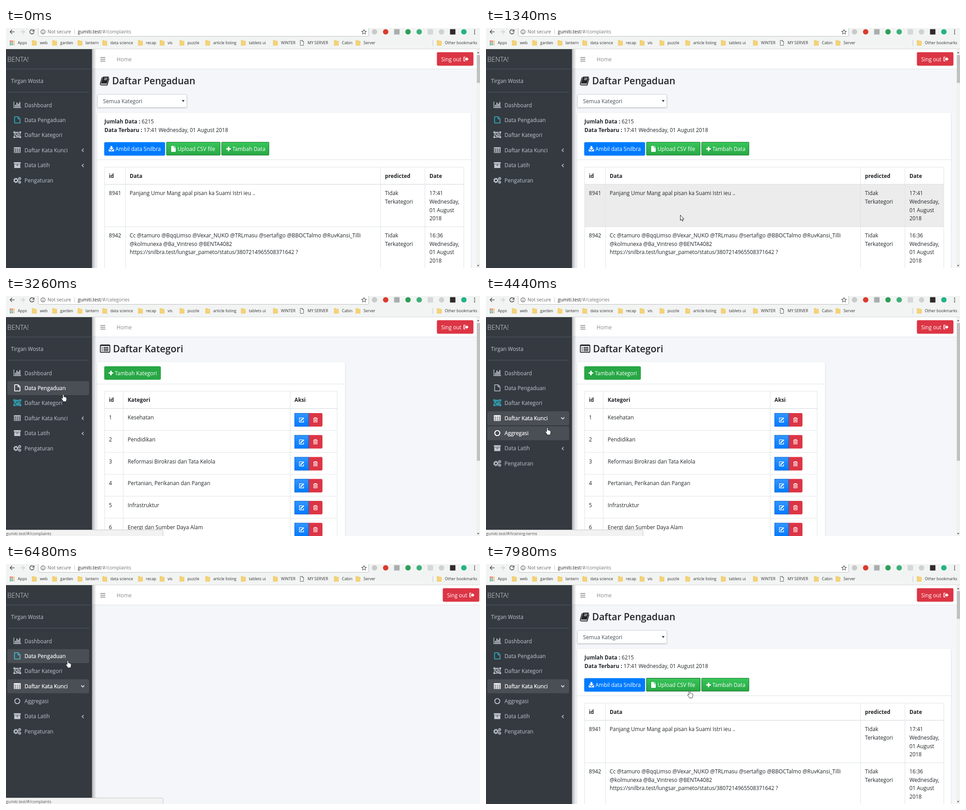
These frames come from a looping animation (1050 px wide and 533 px high, 8 s). An HTML page:

```html
<!DOCTYPE html>
<html lang="id">
<head>
<meta charset="utf-8">
<title>Daftar Pengaduan</title>
<style>
html, body { margin: 0; width: 100%; height: 100%; overflow: hidden; background: #f4f6f9; }
svg { display: block; }
text { font: 11.8px "Open Sans", "Noto Sans", sans-serif; fill: currentColor; white-space: pre; }
.b { font-weight: 700; }
.h { font-size: 21px; font-weight: 600; }
.brand { font-size: 14.9px; font-weight: 300; }
.url { font-size: 10.3px; }
.mark, .stat { font-size: 8.75px; }
.ln { fill: none; stroke: currentColor; }
.so { fill: currentColor; }
.rule { fill: none; stroke: #dee2e6; }
.card { fill: #fff; filter: drop-shadow(0 1px 1px rgba(0,0,0,.2)); }
.field { fill: #fff; stroke: #ced4da; }

/* one loop is 8 s, so 1% is 80 ms */
.t { opacity: 0; animation: 8s step-end infinite; }
.f { animation: 8s linear infinite; }

#pageList { animation-name: pageList; }
#pageCat { animation-name: pageCat; }
#pageTerm { animation-name: pageTerm; }
@keyframes pageList { 0%, 33% { opacity: 1 } 36%, 82% { opacity: 0 } 85.875%, 100% { opacity: 1 } }
@keyframes pageCat { 0%, 37% { opacity: 0 } 40%, 57.625% { opacity: 1 } 60.625%, 100% { opacity: 0 } }
@keyframes pageTerm { 0%, 65% { opacity: 0 } 69.375%, 78.125% { opacity: 1 } 81%, 100% { opacity: 0 } }

#urlList, #actData { animation-name: urlList; }
#urlCat, #actCat { animation-name: urlCat; }
#urlTerm, #actTerm { animation-name: urlTerm; }
@keyframes urlList { 0%, 78.125% { opacity: 1 } 33% { opacity: 0 } }
@keyframes urlCat { 33% { opacity: 1 } 57.625% { opacity: 0 } }
@keyframes urlTerm { 57.625% { opacity: 1 } 78.125% { opacity: 0 } }

#row1 { animation-name: row1; }
#row2 { animation-name: row2; }
#upHot { animation-name: upHot; }
@keyframes row1 { 12.5%, 15.75%, 84% { opacity: 1 } 13.625%, 20.5%, 91% { opacity: 0 } }
@keyframes row2 { 2.75%, 13.625% { opacity: 1 } 3.75%, 15.75% { opacity: 0 } }
@keyframes upHot { 98.875% { opacity: 1 } }

#hotData { animation-name: hotData; }
#hotCat { animation-name: hotCat; }
#hotKey { animation-name: hotKey; }
#hotAgg { animation-name: hotAgg; }
@keyframes hotData { 39%, 63.375% { opacity: 1 } 42%, 83% { opacity: 0 } }
@keyframes hotCat { 24.25%, 42%, 62.5% { opacity: 1 } 39%, 43%, 63.375% { opacity: 0 } }
@keyframes hotKey { 43% { opacity: 1 } }
@keyframes hotAgg { 54.625% { opacity: 1 } 61.625% { opacity: 0 } }

#agg { animation-name: agg; }
#low { animation-name: low; }
#chev { animation-name: chev; }
@keyframes agg { 0%, 46.5% { opacity: 0 } 49%, 100% { opacity: 1 } }
@keyframes low { 0%, 45.875% { transform: none } 49%, 100% { transform: translateY(33.4px) } }
@keyframes chev {
  0%, 42.9% { color: #c2c7d0 } 43% { color: #fff }
  0%, 45.875% { transform: rotate(0deg) } 49%, 100% { transform: rotate(-90deg); color: #fff }
}

#bar { animation-name: bar; }
#thumbShort { animation-name: thumbShort; }
#thumbLong { animation-name: thumbLong; }
#out { opacity: 1; animation-name: out; }
@keyframes bar { 0%, 82% { opacity: 1 } 64.375% { opacity: 0 } }
@keyframes thumbShort { 0%, 82% { opacity: 1 } 37% { opacity: 0 } }
@keyframes thumbLong { 37% { opacity: 1 } 64.375% { opacity: 0 } }
@keyframes out { 0%, 82% { transform: none } 64.375% { transform: translateX(13px) } }

#status { animation-name: status; }
#stCat { animation-name: stCat; }
#stList { animation-name: stList; }
#stTerm { animation-name: stTerm; }
@keyframes status { 27.375%, 54.625% { opacity: 1 } 45.875%, 89.125% { opacity: 0 } }
@keyframes stCat { 27.375%, 42% { opacity: 1 } 39%, 45.875% { opacity: 0 } }
@keyframes stList { 39%, 63.375% { opacity: 1 } 42%, 89.125% { opacity: 0 } }
@keyframes stTerm { 54.625% { opacity: 1 } 63.375% { opacity: 0 } }

#cursor { opacity: 1; animation-name: move; }
#arrow { animation-name: arrow; }
#hand { animation-name: hand; }
@keyframes arrow { 0%, 83% { opacity: 1 } 24.25%, 98.875% { opacity: 0 } }
@keyframes hand { 24.25%, 98.875% { opacity: 1 } 83% { opacity: 0 } }
@keyframes move {
  0% { transform: translate(800px, 560px) }
  2.75% { transform: translate(800px, 480px) }
  3.75% { transform: translate(745px, 322px) }
  6.5% { transform: translate(690px, 315px) }
  7.5% { transform: translate(600px, 297px) }
  8.375% { transform: translate(549px, 285px) }
  10.625% { transform: translate(548px, 286px) }
  11.5% { transform: translate(540px, 330px) }
  12.5% { transform: translate(520px, 380px) }
  13.625% { transform: translate(500px, 450px) }
  14.625% { transform: translate(480px, 470px) }
  15.75% { transform: translate(455px, 432px) }
  16.75% { transform: translate(430px, 415px) }
  19.375% { transform: translate(380px, 370px) }
  20.5% { transform: translate(310px, 300px) }
  21.375% { transform: translate(272px, 253px) }
  23.125% { transform: translate(235px, 247px) }
  24.25% { transform: translate(172px, 242px) }
  25.375% { transform: translate(150px, 239px) }
  27.375% { transform: translate(135px, 238px) }
  29.125% { transform: translate(122px, 237px) }
  39% { transform: translate(122px, 211px) }
  40% { transform: translate(122px, 218px) }
  42% { transform: translate(124px, 235px) }
  43% { transform: translate(128px, 261px) }
  53.625% { transform: translate(130px, 278px) }
  54.625% { transform: translate(131px, 292px) }
  56% { transform: translate(131px, 298px) }
  61.625% { transform: translate(132px, 262px) }
  62.5% { transform: translate(132px, 240px) }
  63.375% { transform: translate(132px, 215px) }
  64.375% { transform: translate(132px, 218px) }
  78.125% { transform: translate(132px, 214px) }
  83% { transform: translate(210px, 250px) }
  84% { transform: translate(340px, 360px) }
  85% { transform: translate(450px, 400px) }
  85.875% { transform: translate(470px, 400px) }
  89.125% { transform: translate(465px, 380px) }
  90% { transform: translate(460px, 360px) }
  91% { transform: translate(455px, 323px) }
  91.875% { transform: translate(455px, 338px) }
  93.875% { transform: translate(454px, 325px) }
  94.875% { transform: translate(453px, 305px) }
  95.75% { transform: translate(451px, 292px) }
  96.625% { transform: translate(450px, 285px) }
  98.875% { transform: translate(446px, 281px) }
}
</style>
</head>
<body>
<svg width="1050" height="533" viewBox="0 0 1050 533" color="#212529">
<defs>
  <linearGradient id="green" x2="0" y2="1"><stop stop-color="#38c65a"/><stop offset="1" stop-color="#28a745"/></linearGradient>
  <linearGradient id="blue" x2="0" y2="1"><stop stop-color="#3395ff"/><stop offset="1" stop-color="#007bff"/></linearGradient>
  <linearGradient id="shade"><stop stop-color="#000" stop-opacity=".28"/><stop offset="1" stop-color="#000" stop-opacity="0"/></linearGradient>

  <g id="chart"><path class="ln" stroke-width="1.4" d="M-7.5-7V6.3H8.5"/><path class="ln" stroke-width="2.2" d="M-4 5V0M-.8 5V-5M2.4 5V-2.5M5.6 5V-6"/></g>
  <path id="file" class="ln" stroke-width="1.4" d="M-5.8-6.8H1.8L6-2.6V6.8H-5.8ZM1.6-6.8V-2.4H6"/>
  <g id="group"><path class="ln" stroke-width="1.3" d="M-6.5-5.5H6.5V5.5H-6.5ZM-4-3.5H1.5V1H-4ZM1.5-1.5H4V3.5H-1.5V1"/><path class="so" d="M-8.5-7.2h3.6v3.4h-3.6zM4.9-7.2h3.6v3.4H4.9zM-8.5 3.8h3.6v3.4h-3.6zM4.9 3.8h3.6v3.4H4.9z"/></g>
  <g id="table"><path class="ln" stroke-width="1.4" d="M-6.6-5.3H6.6V5.6H-6.6ZM-7-1.6H7M-7 2H7M-2.2-5V5.5M2.2-5V5.5"/><path class="so" d="M-7.2-6.2H7.2V-3.8H-7.2z"/></g>
  <g id="archive"><path class="so" d="M-7.5-6.5h15v3.7h-15zM-6.7-2h13.4v8.5H-6.7zM-2-.6v1.4h4V-.6z" fill-rule="evenodd"/></g>
  <g id="cogs" class="ln"><circle cx="-3" cy=".5" r="3.4" stroke-width="2.2"/><circle cx="-3" cy=".5" r="5" stroke-width="1.7" stroke-dasharray="2.1 1.83"/><circle cx="5.3" cy="-3.6" r="1.9" stroke-width="1.4"/><circle cx="5.3" cy="-3.6" r="2.8" stroke-width="1.1" stroke-dasharray="1.3 .9"/><circle cx="5.3" cy="4.4" r="1.9" stroke-width="1.4"/><circle cx="5.3" cy="4.4" r="2.8" stroke-width="1.1" stroke-dasharray="1.3 .9"/></g>
  <circle id="ring" class="ln" r="5.6" stroke-width="1.9"/>
  <path id="plus" class="ln" stroke-width="3" d="M-5 0H5M0-5V5"/>
  <g id="load"><path class="so" d="M-1.8-6h3.6v4H5L0 3-5-2h3.2z"/><path class="so" d="M-6 1.5h2.5L0 5l3.5-3.5H6V6H-6z"/></g>
  <path id="page" class="so" d="M-5-6.5H1V-2H5V6.5H-5ZM2-6.5L5-3H2Z"/>
  <g id="edit"><path class="ln" stroke-width="1.3" d="M2-4.3H-5V5H4.3V1"/><path class="ln" stroke-width="2.6" d="M-1.6 1.6L4.8-4.4"/><path class="so" d="M-2.8 3v-3l3 2.6z"/></g>
  <g id="trash"><path class="ln" stroke-width="1.2" d="M-4.8-3.4H4.8M-1.8-3.6V-5H1.8V-3.6M-3.6-3V4.8H3.6V-3"/><path class="ln" d="M-1.6-1.4V3M0-1.4V3M1.6-1.4V3"/></g>
  <g id="eye"><path class="ln" stroke-width="1.4" d="M-6 0Q0-7 6 0Q0 7-6 0Z"/><circle class="so" r="2.4"/></g>
  <path id="select" d="M389.500 160h6l-3 4.500z" fill="#343a40"/>
</defs>

<rect width="1050" height="533" fill="#f4f6f9"/>

<g id="pageList" class="f">
  <g transform="translate(218.500 117.500)"><path d="M-3.500-9.500H9.500L5 6H-8Z" fill="#212529"/><path class="ln" stroke-width="1.800" d="M-5.500-8L-9.500 6Q-10 9-7 9H5.500L9.700-5.500"/><path d="M-.5-6H6M-1.500-2.800H5" stroke="#f4f6f9" stroke-width="1.300"/></g>
  <text class="h" x="235" y="125">Daftar Pengaduan</text>
  <rect class="field" x="202.500" y="147.500" width="198" height="29" rx="2" filter="drop-shadow(0 1px 1px rgba(0,0,0,.2))"/>
  <text x="215" y="167" color="#495057">Semua Kategori</text><use href="#select"/>
  <rect class="card" x="202" y="188.500" width="828" height="360" rx="3"/>
  <text x="218" y="212"><tspan class="b">Jumlah Data :</tspan> 6215</text>
  <text x="218" y="230.600"><tspan class="b">Data Terbaru :</tspan> 17:41 Wednesday, 01 August 2018</text>
  <g color="#fff">
    <rect x="217.500" y="253.500" width="135" height="30" rx="3" fill="#007bff"/>
    <use href="#load" x="233.500" y="268"/><text x="242.500" y="273">Ambil data Snilbra</text>
    <g fill="url(#green)" stroke="#1f7a34"><rect x="355.500" y="253.500" width="119" height="29" rx="1"/><rect x="477.500" y="253.500" width="105" height="29" rx="1"/></g>
    <rect id="upHot" class="t" x="355.500" y="253.500" width="119" height="29" rx="1" fill="url(#green)" stroke="#14591f"/>
    <use href="#page" x="371" y="268.500"/><text x="380" y="273">Upload CSV file</text>
    <use href="#plus" x="493" y="268.500"/><text x="501.500" y="273">Tambah Data</text>
  </g>
  <path class="rule" d="M202 292.500H1030"/>
  <g id="row1" class="t"><rect x="218" y="348" width="796" height="93" fill="rgba(0,0,0,.075)"/></g>
  <g id="row2" class="t"><rect x="218" y="441" width="796" height="93" fill="rgba(0,0,0,.075)"/></g>
  <path class="rule" d="M218 309H1014M218 441.500H1014M218.500 309V533M264.500 309V533M829.500 309V533M928 309V533M1014 309V533"/>
  <path class="rule" stroke-width="1.600" d="M218 347.300H1014"/>
  <g id="listText"></g>
</g>

<g id="pageCat" class="f">
  <g transform="translate(219.500 117)"><rect class="ln" x="-10.500" y="-8.300" width="21" height="16.500" rx="2" stroke-width="1.800"/><path class="ln" stroke-width="1.900" d="M-10-7H10M-7.500-2.500H-5.500M-3.500-2.500H7.500M-7.500 1H-5.500M-3.500 1H7.500M-7.500 4.500H-5.500M-3.500 4.500H7.500"/></g>
  <text class="h" x="237" y="125">Daftar Kategori</text>
  <rect class="card" x="202" y="147" width="549" height="400" rx="3"/>
  <rect x="217.500" y="156" width="125.500" height="30" rx="3" fill="#28a745"/>
  <g color="#fff"><use href="#plus" x="232.500" y="171"/><text x="241" y="175.500">Tambah Kategori</text></g>
  <path class="rule" d="M202 195.500H751M218 211.500H734M218.500 211V533M259.500 211V533M629.500 211V533M733.500 211V533"/>
  <path class="rule" stroke-width="1.600" d="M218 249.700H734"/>
  <g id="catText"></g>
</g>

<g id="pageTerm" class="f">
  <text class="h" x="208" y="125">Daftar Kata Kunci Hasil Aggregasi</text>
  <rect class="field" x="202.500" y="147.500" width="201" height="30" rx="2"/>
  <text x="215" y="167" color="#495057">Semua Kategori</text><use href="#select" x="3"/>
  <rect class="card" x="202" y="188.500" width="700" height="160" rx="3"/>
  <rect class="field" x="218.500" y="217.500" width="667" height="28" rx="3"/>
  <text x="227" y="236" color="#6c757d">Cari Kata Kunci...</text>
  <g color="#fff">
    <rect x="218" y="258.500" width="136" height="29" rx="3" fill="#28a745"/>
    <use href="#plus" x="232.500" y="273"/><text x="241" y="277.500">Tambah Kata Kunci</text>
    <rect x="358" y="258.500" width="162" height="29" rx="3" fill="#007bff"/>
    <use href="#table" transform="translate(373 273) scale(.85)"/><text x="382.500" y="277.500">Bentuk matriks Asosiasi</text>
    <rect x="524" y="258.500" width="152" height="29" rx="3" fill="#6c757d"/>
    <use href="#eye" x="540" y="273"/><text x="550" y="277.500">Lihat matriks Asosiasi</text>
  </g>
  <circle class="ln" cx="224" cy="323" r="4.700" stroke-width="2.200" stroke-dasharray="1.900 1.790"/>
  <text x="233" y="327.500">Loading</text>
</g>

<!-- top navigation -->
<rect x="190" y="47" width="860" height="43.500" fill="#fff"/>
<path class="rule" d="M190 91H1050"/>
<path d="M209 65.500H220M209 69.500H220M209 73.500H220" stroke="#7d7f81" stroke-width="1.700"/>
<text x="245" y="74" color="#888b8e">Home</text>
<g id="out" class="t" color="#fff">
  <rect x="954.500" y="53.800" width="81" height="30" rx="3" fill="#dc3545"/>
  <text x="964" y="73.500">Sing out</text>
  <g transform="translate(1019 69)"><path class="ln" stroke-width="1.500" d="M-1-4.300H-4.700V4.300H-1"/><path class="so" d="M-2.500-1.700H1V-4.600L5.700 0L1 4.600V1.700H-2.500z"/></g>
</g>
<g id="bar" class="t"><rect x="1042" y="47" width="8" height="486" fill="#f1f1f1"/><path d="M1043.500 56h5l-2.500-3zM1043.500 526.500h5l-2.500 3z" fill="#505050"/></g>
<rect id="thumbShort" class="t" x="1043" y="60" width="7" height="62" fill="#c1c1c1"/>
<rect id="thumbLong" class="t" x="1043" y="60" width="7" height="306" fill="#c1c1c1"/>

<!-- sidebar -->
<rect x="190" y="47" width="10" height="486" fill="url(#shade)"/>
<rect y="47" width="190.500" height="486" fill="#343a40"/>
<path d="M0 91H190M3 142.500H184" stroke="#4f5962"/>
<g color="#c2c7d0">
  <text class="brand" x="3" y="75" color="#dfe2e6">BENTA!</text>
  <text x="11" y="121.500">Tirgan Wosta</text>
  <g><use href="#chart" x="25" y="170.500"/><text x="41" y="175.500">Dashboard</text></g>
  <g id="itData"><use href="#file" x="25" y="204"/><text x="41" y="209">Data Pengaduan</text></g>
  <g id="itCat"><use href="#group" x="25" y="237"/><text x="41" y="242.300">Daftar Kategori</text></g>
  <g id="itKey"><use href="#table" x="25" y="271"/><text x="41" y="276">Daftar Kata Kunci</text></g>
  <g id="agg" class="f">
    <g id="itAgg"><use href="#ring" x="25" y="304.500"/><text x="41" y="309.300">Aggregasi</text></g>
  </g>
  <g id="low" class="f">
    <use href="#archive" x="25" y="304.500"/><text x="41" y="309.300">Data Latih</text>
    <path class="ln" stroke-width="1.500" d="M172 302l-3.500 3.400 3.500 3.400"/>
    <use href="#cogs" x="25" y="338"/><text x="41" y="342.700">Pengaturan</text>
  </g>
</g>
<g color="#fff" fill="#fff" id="hots"></g>
<g transform="translate(170 271.500)"><path id="chev" class="ln f" stroke-width="1.500" d="M1.800-3.400L-1.700 0L1.800 3.400"/></g>
<g color="#17a2b8">
  <g id="actData" class="t"><use href="#file" x="25" y="204"/></g>
  <g id="actCat" class="t"><use href="#group" x="25" y="237"/></g>
  <g id="actTerm" class="t"><use href="#ring" x="25" y="304.500"/></g>
</g>

<!-- browser frame -->
<rect width="1050" height="47" fill="#f2f4f3"/>
<path d="M0 46.500H1050" stroke="#d5d7d6"/>
<path d="M71.500 0V16q0 2.500 2.500 2.500H801q2.500 0 2.500-2.500V0" fill="#fff" stroke="#bcbebd"/>
<g fill="none" stroke="#555" stroke-width="1.600">
  <path d="M19 8.500H9M13.500 4L9 8.500L13.500 13"/>
  <path d="M31 8.500H41M36.500 4L41 8.500L36.500 13" stroke="#cfd1d0"/>
  <path d="M61 5.500A4.700 4.700 0 1 0 62 9.500M62.200 3.500V7.200H58.500"/>
  <circle cx="82" cy="8.500" r="4.600" stroke-width="1.200"/><path d="M82 7.500V11.500M82 5.400V6.600" stroke-width="1.200"/>
  <path d="M793 3.500l1.500 3.400 3.700.4-2.800 2.500.8 3.700-3.200-1.900-3.200 1.900.8-3.700-2.800-2.500 3.700-.4z" stroke-width="1.100"/>
  <path d="M152 3V14" stroke="#c4c4c4" stroke-width="1"/>
</g>
<text class="url" x="92" y="12.300" color="#666">Not secure</text>
<g id="urls" color="#777"></g>
<g id="addons"></g>
<g fill="#555"><circle cx="1038" cy="4.500" r="1.300"/><circle cx="1038" cy="8.700" r="1.300"/><circle cx="1038" cy="12.900" r="1.300"/></g>
<g id="marks" color="#333"></g>
<path d="M945.500 27V40" stroke="#c8cac9"/>

<g id="status" class="t"><path d="M-1 519.500H345q3 0 3 3V534H-1z" fill="#f2f2f2" stroke="#c6c6c6"/></g>
<g id="hints" color="#555"></g>

<g id="cursor" class="t">
  <path id="arrow" class="t" d="M.5.5V12.300L3.200 9.800L5 14L6.900 13.200L5.100 9.200H8.800Z" fill="#fff" stroke="#222"/>
  <path id="hand" class="t" d="M3.500 9.500V2Q3.500.5 4.800.5T6.100 2V6Q8 5 8.600 6.600Q10.200 6 10.700 7.400Q12.200 7 12.200 8.800V12Q12 14 10.800 16.500H5Q4 14 1 10.500Q.2 8.700 1.800 8.300Z" fill="#fff" stroke="#222" stroke-width=".9"/>
</g>
</svg>
<script>
const put = (id, html) => { document.getElementById(id).innerHTML = html; };
const text = (x, y, s, cls = '') => `<text x="${x}" y="${y}" class="${cls}">${s}</text>`;
const lines = (x, y, list) => list.map((s, i) => text(x, y + i * 18.7, s)).join('');
const host = 'gumiti.test';

const heads = (y, list) => list.map(([x, s]) => text(x, y, s, 'b')).join('');
const complaint = (y, id, body, time) =>
  text(228, y, id) + lines(274, y, body) + lines(839.5, y, ['Tidak', 'Terkategori']) +
  lines(938, y, [time, 'Wednesday,', '01 August', '2018']);
put('listText',
  heads(332.5, [[228, 'id'], [274, 'Data'], [839.5, 'predicted'], [938, 'Date']]) +
  complaint(371.3, 8941, ['Panjang Umur Mang apal pisan ka Suami Istri ieu ..'], '17:41') +
  complaint(465, 8942, [
    'Cc @tamuro @BqqLimso @Vexar_NUKO @TRLmasu @sertafigo @BBOCTalmo @RuvKansi_Tilli',
    '@kolmunexa @Ba_Vintreso @BENTA4082',
    'https://snilbra.test/lungsar_pameto/status/3807214965508371642 ?'], '16:36'));

const topics = ['Kesehatan', 'Pendidikan', 'Reformasi Birokrasi dan Tata Kelola',
  'Pertanian, Perikanan dan Pangan', 'Infrastruktur', 'Energi dan Sumber Daya Alam'];
put('catText',
  heads(235, [[228, 'id'], [269.5, 'Kategori'], [639, 'Aksi']]) +
  topics.map((s, i) => `<g transform="translate(0 ${i * 48.75})">` +
    text(228, 274, i + 1) + text(269.5, 274, s) +
    `<path class="rule" d="M218 298.500H734"/>
    <rect x="639.500" y="260.500" width="31" height="29" fill="url(#blue)" stroke="#0062cc"/>
    <path d="M671 260H698q3 0 3 3V287q0 3-3 3H671z" fill="#dc3545"/>
    <g color="#fff"><use href="#edit" x="655" y="275"/><use href="#trash" x="685.500" y="275"/></g></g>`).join(''));

put('hots', [['Data', 189], ['Cat', 222.3], ['Key', 256], ['Agg', 289.3]].map(([k, y]) =>
  `<g id="hot${k}" class="t"><rect x="3" y="${y}" width="181" height="31" rx="3" fill-opacity=".11"/>
  <use href="#it${k}"/></g>`).join(''));

const routes = [['List', 'complaints'], ['Cat', 'categories'], ['Term', 'training-terms']];
put('urls', routes.map(([k, p]) =>
  `<g id="url${k}" class="t">` + text(159, 12.3, `<tspan fill="#222">${host}</tspan>/#/${p}`, 'url') + '</g>').join(''));
put('hints', routes.map(([k, p]) =>
  `<g id="st${k}" class="t">` + text(0, 530.8, `${host}/#/${p}`, 'stat') + '</g>').join(''));

// extension buttons: round or square, one colour each
put('addons', [['#c9cbca', 1], ['#dc3a2c', 1], ['#a9adab', 0], ['#2f9e58', 1], ['#3fae7c', 1],
  ['#d6d8d7', 0], ['#d0d2d1', 1], ['#2e2c2a', 0], ['#20b38a', 1]].map(([c, round], i) =>
  `<rect x="${810.3 + i * 24.75}" y="2.500" width="12" height="12" rx="${round ? 6 : 1}" fill="${c}"/>`).join(''));

const folder = x => `<path d="M${x} 27.500h4l1 1.500h4.500v9.500H${x}z" fill="#f6d274" stroke="#e5bd55" stroke-width=".6"/>`;
const sheet = x => `<path d="M${x + 1} 27.500h4.500l2.500 2.500v8.500h-7zm4.500 0v2.500h2.500" fill="#fff" stroke="#555"/>`;
const marks = [[75, 'web'], [120, 'garden'], [176, 'lantern'], [231, 'data science'], [310, 'recap'],
  [358, 'vis'], [402, 'puzzle'], [459, 'article listing'], [538, 'tablets ui'], [609, 'WINTER'],
  [668, 'MY SERVER'], [744, 'Cabin'], [792, 'Server'], [972, 'Other bookmarks']];
const dots = ['#e5483a', '#e5483a', '#f0b429', '#35a45b', '#4a7fe0', '#f0b429', '#35a45b', '#4a7fe0', '#f0b429'];
put('marks',
  dots.map((c, i) => `<rect x="${8.5 + i % 3 * 3.8}" y="${28 + Math.floor(i / 3) * 3.8}" width="2.600" height="2.600" fill="${c}"/>`).join('') +
  text(26, 36.3, 'Apps', 'mark') +
  marks.map(([x, s]) => (s === 'MY SERVER' ? sheet : folder)(x - 17) + text(x, 36.3, s, 'mark')).join(''));
</script>
</body>
</html>
```
